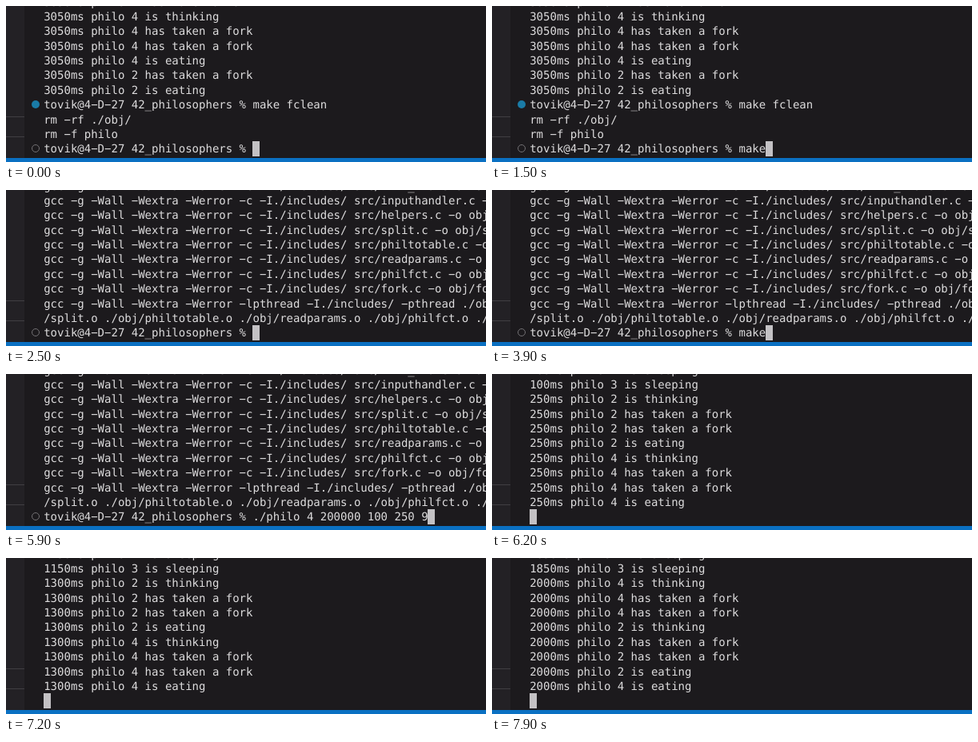
An HTML page that plays this animation: 600x195 px, repeating every 8 s.

```html
<!DOCTYPE html>
<html lang="en">
<head>
<meta charset="utf-8">
<title>Terminal session</title>
<style>
  html, body { margin: 0; width: 100%; height: 100%; overflow: hidden; background: #1c1a1d; }
  #stage { position: relative; width: 600px; height: 195px; overflow: hidden; background: #1c1a1d; }
  #side { position: absolute; left: 0; top: 0; width: 23px; height: 190px; background: #232125; }
  #side i { position: absolute; left: 0; width: 23px; height: 1px; background: #413f43; }
  #bar { position: absolute; left: 0; top: 190px; width: 600px; height: 5px; background: #0a70c2; }
  #rows {
    position: absolute; left: 47.2px; bottom: 6.2px;
    font: 14px/18.4px "DejaVu Sans Mono", "Liberation Mono", monospace;
    color: #dddcdd; white-space: pre; text-rendering: geometricPrecision;
  }
  .row { position: relative; height: 18.4px; }
  .dot {
    position: absolute; left: -15.5px; top: 2.9px; box-sizing: border-box;
    width: 10px; height: 10px; border: 1.5px solid #737174; border-radius: 50%;
  }
  .dot.done { border: 0; background: #1a7ba6; }
  .caret { position: absolute; top: -1.3px; margin-left: -.4px; width: 9.2px; height: 19px; background: #c3c1c4; }
  #beam { position: absolute; left: -6px; top: -9.5px; fill: none; stroke: #b9b7ba; }
</style>
</head>
<body>
<div id="stage">
  <div id="side"><i style="top:138px"></i><i style="top:163px"></i></div>
  <div id="rows"></div>
  <svg id="beam" width="12" height="19">
    <path d="M2.5 1.5Q6 1.5 6 4V15Q6 17.5 2.5 17.5M9.5 1.5Q6 1.5 6 4V15Q6 17.5 9.5 17.5M4 12H8"/>
  </svg>
  <div id="bar"></div>
</div>
<script>
const LOOP = 8000, ROWS = 11, RUN = 5890, ENTER = 5940;
const PROMPT = 'tovik@4-D-27 42_philosophers % ';
const CC = 'gcc -g -Wall -Wextra -Werror ';

const lines = [];
const add = (at, text, dot) => lines.push({ at, text, dot });

// Philosopher log helpers
const ACTS = { t: 'is thinking', f: 'has taken a fork', e: 'is eating', s: 'is sleeping' };
const log = (at, ms, script) => {
  for (const step of script.split(' ')) add(at, `${ms}ms philo ${step[0]} ${ACTS[step[1]]}`);
};

// Left over from the previous run
log(0, 3050, '2f 4t 4f 4f 4e 2f 2e');
add(0, PROMPT + 'make fclean', 'done');
add(0, 'rm -rf ./obj/');
add(0, 'rm -f philo');
add(0, PROMPT, 'open');

// Build
add(1700, 'mkdir -p ./obj/');
const sources = [
  ['main', 1700], ['free_func', 1800], ['init_frame', 1800], ['inputhandler', 1900],
  ['helpers', 2000], ['split', 2100], ['philtotable', 2100], ['readparams', 2200],
  ['philfct', 2200], ['fork', 2300]
];
for (const [name, at] of sources)
  add(at, `${CC}-c -I./includes/ src/${name}.c -o obj/${name}.o`);
add(2300, CC + '-lpthread -I./includes/ -pthread ./obj/main.o ./obj/free_func.o');
add(2300, '/split.o ./obj/philtotable.o ./obj/readparams.o ./obj/philfct.o ./obj/fork.o -o philo');
add(2500, PROMPT, 'open');

// Simulation: eating takes 100 ms, sleeping 250 ms
const emit = (ms, script) => log(Math.max(ENTER, RUN + ms), ms, script);
for (let k = 0; k < 6; k++) {
  const ms = k * 350;
  emit(ms, k ? '3t 4s 1t 1f 1f 1e 2s 3f 3f 3e' : '1f 1f 1e 2s 3f 3f 3e 4s');
  emit(ms + 100, '1s 3s');
  emit(ms + 250, k % 4 === 1 ? '4t 4f 4f 2t 2f 2f 2e 4e' : '2t 2f 2f 2e 4t 4f 4f 4e');
}

const typed = [
  [0, ''], [1200, 'm'], [1300, 'ma'], [1400, 'mak'], [1500, 'make'],
  [2500, ''], [3900, 'make'], [4200, 'make fclean'], [4600, './philo 4 200000 100 250 9']
];

// Pointer positions; an entry without coordinates hides it
const pointer = [
  [0], [200, 45, 163], [300, 528, 150], [400, 493, 138], [600, 560, 160],
  [700, 580, 169.5], [900, 581, 169.5], [1000, 580, 169.5], [1200],
  [5200, 582, 169], [5300]
];

const latest = (list, t) => list.filter(e => e[0] <= t).pop();
const rowsBox = document.getElementById('rows');
const beam = document.getElementById('beam');
let shown = '';

// The terminal face has a hyphen as wide as a minus sign
const wideHyphens = text => text.replaceAll('-', '\u2212');

function rowHtml({ text, dot }, last) {
  return `<div class="row">${dot ? `<b class="dot ${dot}"></b>` : ''}${wideHyphens(text)}` +
    `${last ? '<b class="caret"></b>' : ''}</div>`;
}

function draw(t) {
  const view = lines.filter(l => l.at <= t);
  const current = view.findLastIndex(l => l.dot);
  const { text, dot } = view[current];
  view[current] = { text: text + latest(typed, t)[1], dot };
  if ((t >= 1700 && t < 2500) || t >= ENTER) view.push({ text: '' });

  const tail = view.slice(-ROWS);
  const html = tail.map((l, i) => rowHtml(l, i === tail.length - 1)).join('');
  if (html !== shown) rowsBox.innerHTML = shown = html;

  const [, x, y] = latest(pointer, t);
  beam.style.visibility = x ? 'visible' : 'hidden';
  if (x) beam.style.transform = `translate(${x}px, ${y}px)`;
}

const start = performance.now();
function tick() {
  draw((performance.now() - start) % LOOP);
  requestAnimationFrame(tick);
}
tick();
</script>
</body>
</html>
```
